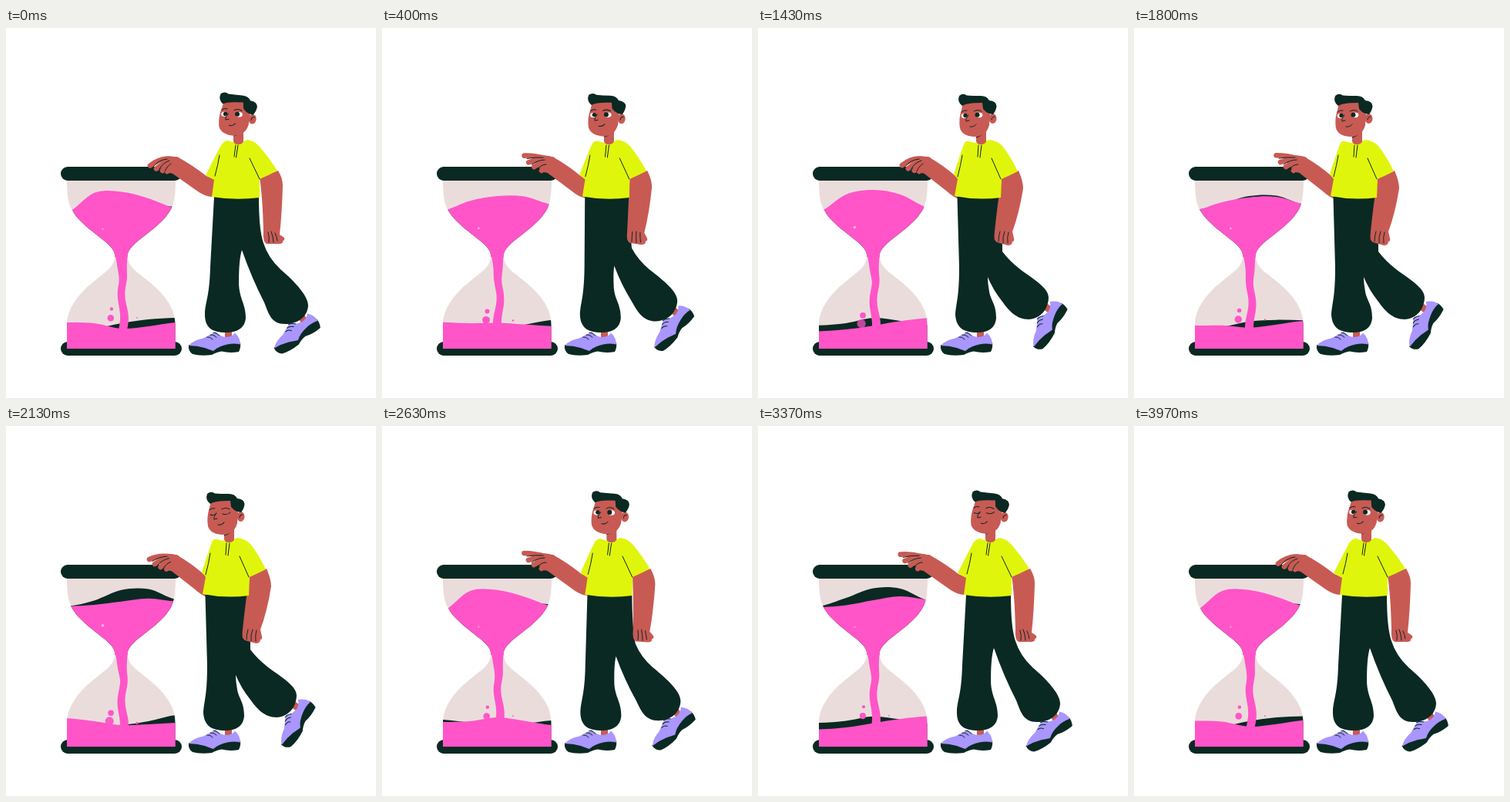
These frames come from a looping animation (480x480 px, 4 s). An HTML page:

```html
<!DOCTYPE html>
<html lang="en">
<head>
<meta charset="utf-8">
<title>Waiting by the hourglass</title>
<style>
  html, body { margin: 0; width: 100%; height: 100%; overflow: hidden; background: #fff; }
  svg { display: block; width: 100vw; height: 100vh; }
  .line { fill: none; stroke: #0a2922; stroke-width: 1; stroke-linecap: round; }
  .finger { fill: none; stroke: #c85a54; stroke-width: 6.6; stroke-linecap: round; }
  .dark { fill: #0a2922; }
  .pink { fill: #ff55c8; }
  .skin { fill: #c85a54; }
  .lime { fill: #e0f50c; }
  .violet { fill: #a996ff; }
  .white { fill: #fff; }
  .pale { fill: #ffb4e4; }
</style>
</head>
<body>
<svg id="stage" viewBox="0 0 480 480">
  <defs>
    <path id="glass" d="M79,198H220C220,212 219,224 215,233C206,253 177,270 166,281C161,286 158,290 158,294C157,306 165,313 173,319C187,330 202,342 210,355C216,364 219.500,374 219.500,385V416H79V385C79,374 83,364 89,355C97,342 112,330 126,319C134,313 142,306 141,294C141,290 138,286 133,281C122,270 93,253 84,233C80,224 79,212 79,198Z"/>
    <clipPath id="inside"><use href="#glass"/></clipPath>
    <g id="shoe">
      <rect class="skin" x="284" y="389" width="9" height="14"/>
      <path class="dark" d="M237,411L304,408Q305,414 302,420Q290,422 280,419.500Q274,420 267,424Q252,426 242,423Q236,419 237,411Z"/>
      <path class="violet" d="M237,412Q243,405 256,402.500Q266,397 272,394Q277,401 287,401Q294,400 297,395.500Q304,402 304,410.500Q296,408.500 287,410.500Q275,413 269,419Q263,417 258,415Q248,412 237,412Z"/>
      <path class="line" d="M261,401Q265,400 268,404M265,398Q269,397 273,401M269,395Q273,395 277,399"/>
    </g>
  </defs>

  <rect class="dark" x="71" y="180" width="157" height="18" rx="9"/>
  <rect class="dark" x="71" y="407" width="157" height="18" rx="9"/>
  <use href="#glass" fill="#ebdcdc"/>
  <g clip-path="url(#inside)">
    <path id="topBack" class="dark"/>
    <path id="topFront" class="pink"/>
    <path id="lowBack" class="dark"/>
    <path id="stream" class="pink"/>
    <path id="lowFront" class="pink"/>
  </g>
  <g id="bubbles"></g>

  <use href="#shoe"/>
  <use id="rearShoe" href="#shoe"/>
  <g id="body"></g>
  <g id="head">
    <path class="skin" d="M266,97L296,95L301,112L300,126Q296,141 280,141Q265,140 262,130Q260,118 264,106Z"/>
    <ellipse class="skin" cx="304.500" cy="117.500" rx="5" ry="6.500"/>
    <path class="dark" d="M261,88Q258,96 265,101Q271,97 291,97L292,105Q295,109 300,111L305,112Q309,107 309.500,101Q309,95 300,94Q297,88 289,88Q279,88 271,87.500Q266,84 261,88Z"/>
    <path class="line" d="M264,109Q267,106 271,107M280,108Q285,105 290,108M273,113Q269,118 270,121L274,120M275,128Q280,129 283,125M303,119Q303,115 307,115"/>
    <g id="eyes">
      <ellipse class="white" cx="267.500" cy="114" rx="3.800" ry="3"/>
      <ellipse class="white" cx="286.800" cy="113" rx="4.500" ry="3.200"/>
      <circle class="dark" cx="269" cy="113.500" r="2.700"/>
      <circle class="dark" cx="284.500" cy="112.700" r="3"/>
    </g>
    <path id="lids" class="line" d="M265,115Q269,117 272,114M281,114Q287,116 291,112"/>
  </g>
  <g id="hand"></g>
</svg>
<script>
const LOOP = 4000;
const $ = id => document.getElementById(id);
const clamp = x => Math.max(0, Math.min(1, x));
const frac = x => x - Math.floor(x);
const lerp = (a, b, k) => a + (b - a) * k;
const sine = x => (1 - Math.cos(Math.PI * clamp(x))) / 2;

function add(parent, tag, cls) {
  const el = document.createElementNS("http://www.w3.org/2000/svg", tag);
  el.setAttribute("class", cls);
  return $(parent).appendChild(el);
}
function attrs(el, values) {
  for (const name in values) el.setAttribute(name, values[name]);
}

// Blend two paths that share the same commands.
function mix(a, b, k) {
  const to = b.match(/-?[\d.]+/g);
  let i = 0;
  return a.replace(/-?[\d.]+/g, n => lerp(+n, +to[i++], k).toFixed(2));
}
const morphs = (parent, list) =>
  list.map(([cls, a, b]) => ({ el: add(parent, "path", cls), a, b }));
const blend = (list, k) =>
  list.forEach(m => m.el.setAttribute("d", mix(m.a, m.b, k)));

// Each part: class, leaning away, leaning in.
const body = morphs("body", [
  ["skin",
    "M210,167L222,167Q242,178 260,192L274,198L268,219Q258,219 246,210L212,186Z",
    "M210,167L221,167Q240,178 255,191L268,198L262,222Q255,221 244,211L212,186Z"],
  ["dark",
    "M270,219L328,219Q328,262 334,279Q340,298 356,313C376,330 392,348 392,360C391,376 377,384 362,384C344,384 341,371 335,356Q319,325 306,288Q302,300 302,332C303,352 311,358 311,376C310,390 299,395 285,395C268,395 258,389 258,372C258,356 264,350 265,310Z",
    "M258.5,219L316,219Q317,262 317,290Q326,302 340,313C362,329 377,338 377,350C376,366 366,377 351,378C335,378 325,366 317,355Q305,340 298,323Q298,332 300,342C302,354 309,358 309,376C308,390 298,395 284,395C267,395 257,389 256,372C257,356 261,350 261,310Z"],
  ["skin",
    "M329,194L353,185Q359,195 359,204Q358,240 355,268L361,272Q362,276 359,276Q360,280 354,280L338,280Q333,278 334,264Q333,220 329,194Z",
    "M316,194L338,185Q344,199 344,208Q339,240 330,264L332,273Q333,277 330,277Q330,282 324,282L310,278Q305,276 307,264Q311,225 316,194Z"],
  ["line",
    "M341,278Q342,271 340,265M347,278Q347,271 344,264M352,276Q351,270 349,266",
    "M312,277Q312,270 314,264M318,279Q317,271 320,264M324,279Q323,271 325,265"],
  ["lime",
    "M288,146Q301,152 313,145Q322,146 329,154Q342,169 352,185Q341,191 329,196L329,220Q298,224 267,219L270,197L259,191Q270,169 279,152Q283,146 288,146Z",
    "M274,147Q286,152 300,145Q310,146 317,153Q328,167 337,186Q327,191 316,196L315,220Q285,224 255,218L259,196L254,190Q261,168 267,151Q269,146 274,147Z"],
  ["line",
    "M277,165Q275,178 271,192M316,169L329,196M298,152L296,167M301,152L298.5,168",
    "M265,165Q263,178 259,193M303,169L315,196M286,152L285,167M290,152L288,168"],
  ["skin",
    "M295,134L295,147Q296,151 301,151Q307,151 308,147L308,130Z",
    "M283,134L283,147Q284,151 289,151Q295,151 296,147L296,130Z"],
  ["line", "M296,140Q301,139 304,136", "M283,142Q288,141 291,138"]
]);

// Each part: class, resting, lifted.
const hand = morphs("hand", [
  ["skin",
    "M224,168Q212,165 204,167L200,173L208,187Q216,190 222,187Z",
    "M224,168Q212,164 205,166L200,171L206,186Q214,189 222,187Z"],
  ["finger", "M213,170Q200,168 187,178.5", "M213,169.5Q198,165 184.5,165"],
  ["finger", "M214,173Q203,175 195,182.5", "M214,173Q201,169 190,174"],
  ["finger", "M215,177Q208,178 203,185", "M215,177Q205,174 197,180"],
  ["finger", "M216,181Q212,182 209,186", "M216,181Q211,180 207,185"],
  ["line",
    "M209,170Q198,171 191,180M212,172Q203,175 199,183M214,176Q209,179 206,186",
    "M209,168Q199,167 188,169M211,171Q202,171 194,177M213,177Q206,177 202,183"]
]);

// Surface heights at five evenly spaced places, keyed by phase.
const WAVES = {
  topFront: [[0, 240, 214, 212.5, 221, 233.5], [.07, 239, 216, 210, 216, 233],
    [.53, 235, 232.5, 226, 221, 225], [.65, 233, 231.5, 229, 226, 229.5], [.95, 240, 214, 213, 222, 233.5]],
  topBack: [[0, 240, 235, 232, 229, 232], [.07, 240, 236, 230, 228, 234],
    [.53, 234, 223, 210.5, 211, 226], [.65, 234, 229, 214.5, 212, 224], [.95, 240, 236, 233, 227, 231]],
  lowFront: [[0, 382, 383, 390, 387, 382], [.065, 379, 383, 388, 387, 385],
    [.315, 384, 383, 378, 382.5, 388], [.435, 387, 382, 375, 378, 384], [.7, 394, 391.5, 386, 380, 376]],
  lowBack: [[0, 390, 390, 383, 378, 376], [.065, 388, 390, 388, 383, 375],
    [.315, 381, 385, 390, 386.5, 382], [.435, 378, 381, 388, 390, 388], [.7, 385.5, 382.5, 376, 380, 386]]
};
function heights(keys, phase) {
  let i = keys.length - 1;
  while (keys[i][0] > phase) i--;
  const from = keys[i], to = keys[(i + 1) % keys.length];
  const k = (phase - from[0]) / (frac(to[0] - from[0]) || 1);
  return from.slice(1).map((y, n) => lerp(y, to[n + 1], k));
}
function surface(ys, floor) {
  const at = i => ys[Math.max(0, Math.min(4, i))];
  let d = `M79,${floor}V${ys[0]}`;
  for (let i = 0; i < 4; i++) {
    const x = 79 + 35.25 * i;
    d += `C${x + 11.75},${at(i) + (at(i + 1) - at(i - 1)) / 6}` +
      ` ${x + 23.5},${at(i + 1) - (at(i + 2) - at(i)) / 6} ${x + 35.25},${at(i + 1)}`;
  }
  return d + `V${floor}Z`;
}
function stream(phase, end) {
  const left = [], right = [];
  for (let y = 288; y <= end; y += 3) {
    const drop = clamp((y - 293) / 38);
    const sway = 2 * sine((y - 305) / 35) * Math.cos(2 * Math.PI * ((y - 345) / 62 - phase));
    const mid = 149.7 + 1.8 * drop - sway;
    const half = lerp(9, 4.8, Math.sqrt(drop)) + .7 * clamp((y - 350) / 30);
    left.unshift(`${mid - half},${y}`);
    right.push(`${mid + half},${y}`);
  }
  return "M" + right.concat(left).join("L") + "Z";
}

const bubbles = ["pink", "pink", "pink", "pale"].map(c => add("bubbles", "circle", c));
function drawBubbles(t) {
  const u = frac(t * 6 / LOOP - .1);
  const rise = 1 - (1 - u) ** 1.5;
  const rows = [
    [lerp(136, 137, u), lerp(373.5, 364.2, rise), 4 - 2 * u],
    [lerp(134, 136, u), lerp(384, 376, rise), 5.7 - 1.6 * u],
    [170, lerp(387, 375.5, rise), 1.6 - .8 * u],
    [125.5, lerp(258.5, 261, u), 1.8 - .9 * u]
  ];
  rows.forEach(([cx, cy, r], i) => attrs(bubbles[i], { cx, cy, r }));
  bubbles[1].setAttribute("opacity", Math.min(1, .5 + 5 * u));
}

const BLINKS = [1000, 2150, 3390];
function draw(t) {
  const lean = sine(t / 720) - sine((t - 2130) / 800);
  blend(body, lean);
  attrs($("rearShoe"), {
    transform: `translate(${lerp(350, 361, lean)} ${lerp(419, 416, lean)})` +
      `rotate(${lerp(-31, -55, lean)})translate(-237 -416)`
  });
  attrs($("head"), {
    transform: `translate(${15 * (1 - lean)} ${lean - 1})rotate(${4.5 * (1 - lean)} 284 120)`
  });

  const gap = Math.min(...BLINKS.map(b => Math.abs(t - b)));
  const open = clamp((gap - 35) / 55);
  attrs($("eyes"), { transform: `translate(0 114)scale(1 ${open})translate(0 -114)` });
  attrs($("lids"), { opacity: open < .3 ? 1 : 0 });

  const tap = frac(t * 5 / LOOP);
  blend(hand, sine((tap - .02) / .25) - sine((tap - .45) / .38));

  const topPhase = frac(t * 3 / LOOP), lowPhase = frac(t * 2 / LOOP);
  for (const id in WAVES) {
    const top = id.startsWith("top");
    const ys = heights(WAVES[id], top ? topPhase : lowPhase);
    $(id).setAttribute("d", surface(ys, top ? 297 : 416));
    if (id === "lowFront") $("stream").setAttribute("d", stream(frac(t * 6 / LOOP), ys[2] + 4));
  }
  drawBubbles(t);
}

const start = performance.now();
function tick() {
  draw((performance.now() - start) % LOOP);
  requestAnimationFrame(tick);
}
tick();
</script>
</body>
</html>
```
